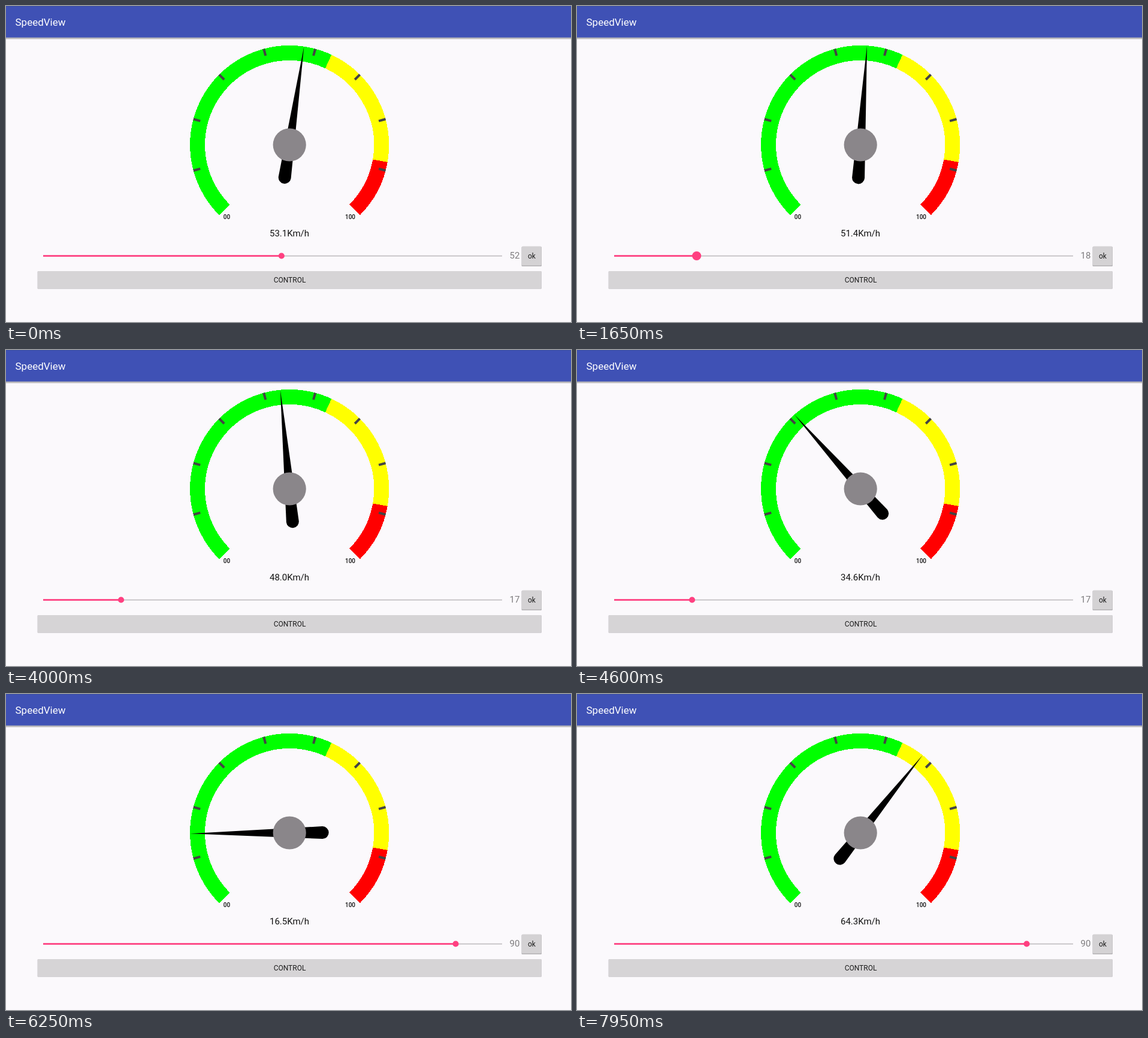
These frames come from a looping animation (943 px wide and 528 px high, 8 s). An HTML page:

```html
<!DOCTYPE html>
<html lang="en">
<head>
<meta charset="utf-8">
<title>SpeedView</title>
<style>
  html, body { margin: 0; width: 100%; height: 100%; overflow: hidden; background: #fbf9fc; }
  svg { display: block; width: 100vw; height: 100vh; font-family: Roboto, sans-serif; }
</style>
</head>
<body>
<svg viewBox="0 0 943 528">
  <defs>
    <linearGradient id="shade" x1="0" y1="0" x2="0" y2="1">
      <stop offset="0" stop-color="#000" stop-opacity=".42"/>
      <stop offset="1" stop-color="#000" stop-opacity="0"/>
    </linearGradient>
  </defs>
  <rect width="943" height="528" fill="#fbf9fc"/>
  <rect y="52.5" width="943" height="4" fill="url(#shade)"/>
  <rect width="943" height="52.6" fill="#3f51b5"/>
  <rect width="943" height="1" fill="#3a4ea3"/>
  <text x="15.5" y="33" font-size="17" fill="#fff">SpeedView</text>

  <g transform="translate(473.2 232)">
    <g id="ring" fill="none" stroke-width="25" shape-rendering="crispEdges"></g>
    <g id="marks" stroke="#444" stroke-width="4"></g>
    <path id="needle" d="M0-166 L10.5 55 A10.5 10.5 0 0 1 -10.5 55 Z"/>
    <circle r="27.6" fill="#8a868a"/>
  </g>
  <g text-anchor="middle" fill="#111">
    <g font-size="10" font-weight="500">
      <text x="368.5" y="356">00</text>
      <text x="574.5" y="356">100</text>
    </g>
    <text id="speed" x="473" y="385.3" font-size="15"></text>
  </g>

  <rect x="62" y="416.7" width="766" height="1.8" fill="#c3c1c4"/>
  <rect id="bar" x="62" y="416.2" height="2.7" fill="#ff4081"/>
  <circle id="thumb" cy="417.5" fill="#ff4081"/>
  <text id="count" x="849" y="422" font-size="15" text-anchor="middle" fill="#7d7b7d"></text>

  <rect x="860.5" y="402" width="33.5" height="33" rx="1.5" fill="#b5b3b6"/>
  <rect id="ok" x="861" y="401.5" width="32.5" height="32" rx="1.5"/>
  <rect x="52.5" y="443" width="841.5" height="29.7" rx="1.5" fill="#c9c7ca"/>
  <rect x="53" y="443" width="840.5" height="29" rx="1.5" fill="#d6d4d6"/>
  <g font-size="12" text-anchor="middle" fill="#1c1c1c">
    <text x="877.4" y="422">ok</text>
    <text x="473.5" y="461.8">CONTROL</text>
  </g>
</svg>
<script>
const LOOP = 8000, STEP = 50;
const $ = id => document.getElementById(id);
const set = (el, attrs) => { for (const k in attrs) el.setAttribute(k, attrs[k]); };
const add = (parent, tag, attrs) => {
  const el = document.createElementNS("http://www.w3.org/2000/svg", tag);
  set(el, attrs);
  parent.appendChild(el);
};
const clamp = u => Math.min(1, Math.max(0, u));
const mix = (a, b, u) => a + (b - a) * u;
const smooth = u => (1 - Math.cos(Math.PI * u)) / 2;

// Degrees clockwise from the top
function arc(from, to, stroke, r = 153.6) {
  const at = deg => {
    const a = deg * Math.PI / 180;
    return `${r * Math.sin(a)} ${-r * Math.cos(a)}`;
  };
  add($("ring"), "path", { d: `M${at(from)} A${r} ${r} 0 0 1 ${at(to)}`, stroke });
}
arc(-135, 25, "#0f0");
arc(25, 100, "#ff0");
arc(100, 135, "#f00");
for (let deg = -105; deg <= 105; deg += 30)
  add($("marks"), "line", { y1: -166, y2: -154.2, transform: `rotate(${deg})` });

const sweeps = [
  { start: 3624, span: 2000, from: 50.9, to: 17 },
  { start: 5624, span: 1000, from: 17, to: 16.3 },
  { start: 6923, span: 1718, from: 16.3, to: 90 },
];
const drags = [
  { down: 1000, still: 1450, up: 2450, from: 52, to: 18, end: 17 },
  { down: 5150, still: 5950, up: 6000, from: 63, to: 90, end: 90 },
];
const taps = sweeps.filter(s => s.span > 1000).map(s => ({ down: s.start - 450, up: s.start }));

const latest = (list, key, t) => list.filter(item => item[key] <= t).pop();

function speedAt(t) {
  const s = latest(sweeps, "start", t);
  if (!s) return 52 + 1.1 * Math.cos(t / 400);
  return mix(s.from, s.to, smooth(clamp((t - s.start) / s.span)));
}

function levelAt(t) {
  const d = latest(drags, "down", t);
  if (!d) return drags[0].from;
  if (t >= d.up) return d.end;
  return Math.round(mix(d.from, d.to, clamp((t - d.down) / (d.still - d.down))));
}

// 1 while held, fading to 0 after release
function pressure(list, t) {
  const p = latest(list, "down", t);
  return p ? 1 - clamp((t - p.up) / 250) : 0;
}

function draw(time) {
  const t = Math.floor(time / STEP) * STEP;

  const speed = speedAt(t);
  set($("needle"), { transform: `rotate(${(speed - 50) * 2.7})` });
  $("speed").textContent = speed.toFixed(1) + "Km/h";

  const level = levelAt(t), width = level * 7.65;
  set($("bar"), { width });
  set($("thumb"), { cx: 62 + width, r: mix(5.1, 7.6, pressure(drags, t)) });
  $("count").textContent = level;

  const tone = Math.round(mix(212, 192, pressure(taps, t)));
  set($("ok"), { fill: `rgb(${tone},${tone - 2},${tone})` });
}

function tick() {
  draw(performance.now() % LOOP);
  requestAnimationFrame(tick);
}
tick();
</script>
</body>
</html>
```
